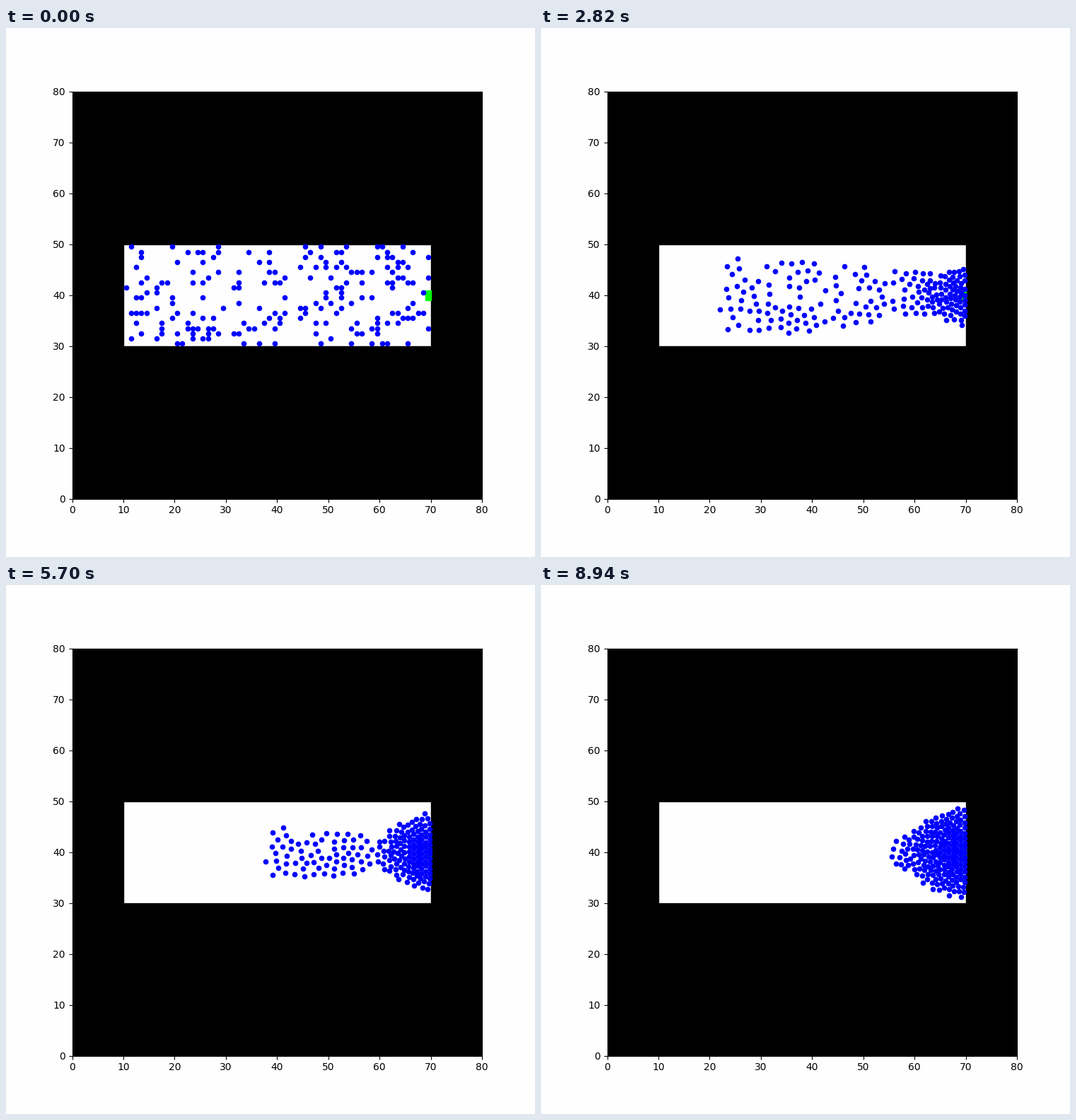
A matplotlib script that plays this animation: 748x748 px, repeating every 9000 ms.

```python
import numpy as np
import matplotlib.pyplot as plt
from matplotlib.animation import FuncAnimation
from matplotlib.patches import Rectangle

FRAMES, STEP_MS, SUB = 150, 60, 4
LEFT, RIGHT, LOW, HIGH = 10, 70, 30, 50
GOAL = np.array([69.5, 40.0])
SPEED, TAU = 0.333, 11.0        # units per frame, frames
PUSH, RANGE, STIFF = 0.03, 0.2, 3.0
PAPER = "#fefefe"

# cells of the last walkers, by column
TAIL = {10: [41], 11: [49, 36, 31], 12: [45, 39, 36, 34],
        13: [48, 47, 42, 39, 36, 32], 14: [43, 40, 36],
        16: [41, 40, 37, 31], 17: [42, 34, 33, 32], 18: [42],
        19: [49, 39, 38, 35]}


def start_cells(count=162, seed=5):
    rng = np.random.default_rng(seed)
    tail = [(x, y) for x, ys in TAIL.items() for y in ys]
    picks = rng.choice(50 * 20, count, replace=False)
    rest = np.column_stack([20 + picks % 50, LOW + picks // 50])
    return np.vstack([tail, rest]) + 0.5


def repel(gap, reach):
    return PUSH * np.exp((reach - gap) / RANGE)


def crowd_force(pos):
    diff = pos[:, None] - pos[None]
    dist = np.sqrt((diff ** 2).sum(-1)) + 1e-6
    size = repel(dist, 1.0) + STIFF * np.clip(0.95 - dist, 0, None)
    np.fill_diagonal(size, 0)
    return ((size / dist)[..., None] * diff).sum(1)


def wall_force(pos):
    x, y = pos.T
    fx = repel(x - LEFT, 0.45) - repel(RIGHT - x, 0.45)
    fy = repel(y - LOW, 0.75) - repel(HIGH - y, 0.75)
    return np.column_stack([fx, fy])


def simulate():
    pos = start_cells()
    vel = np.zeros_like(pos)
    path = [pos.copy()]
    dt = 1 / SUB
    for _ in range(FRAMES - 1):
        for _ in range(SUB):
            way = GOAL - pos
            way /= np.maximum(np.hypot(*way.T), 1)[:, None]
            vel += dt * ((SPEED * way - vel) / TAU
                         + crowd_force(pos) + wall_force(pos))
            pos += dt * vel
            pos[:, 0] = np.clip(pos[:, 0], LEFT + 0.3, RIGHT - 0.3)
            pos[:, 1] = np.clip(pos[:, 1], LOW + 0.3, HIGH - 0.3)
        path.append(pos.copy())
    return path


path = simulate()

fig, ax = plt.subplots(figsize=(7.48, 7.48), dpi=100, facecolor=PAPER)
ax.set_facecolor("black")
ax.set_xlim(0, 80)
ax.set_ylim(0, 80)
ax.add_patch(Rectangle((LEFT, LOW), RIGHT - LEFT, HIGH - LOW,
                       fc=PAPER, ec="black", lw=1))
ax.add_patch(Rectangle((69, 39), 1, 2, color="lime", lw=1))
dots = ax.scatter(*path[0].T, s=20, c="blue", zorder=3)


def draw(i):
    dots.set_offsets(path[i])
    return dots,


anim = FuncAnimation(fig, draw, frames=FRAMES, interval=STEP_MS,
                     repeat=True, repeat_delay=0)
plt.show()
```
